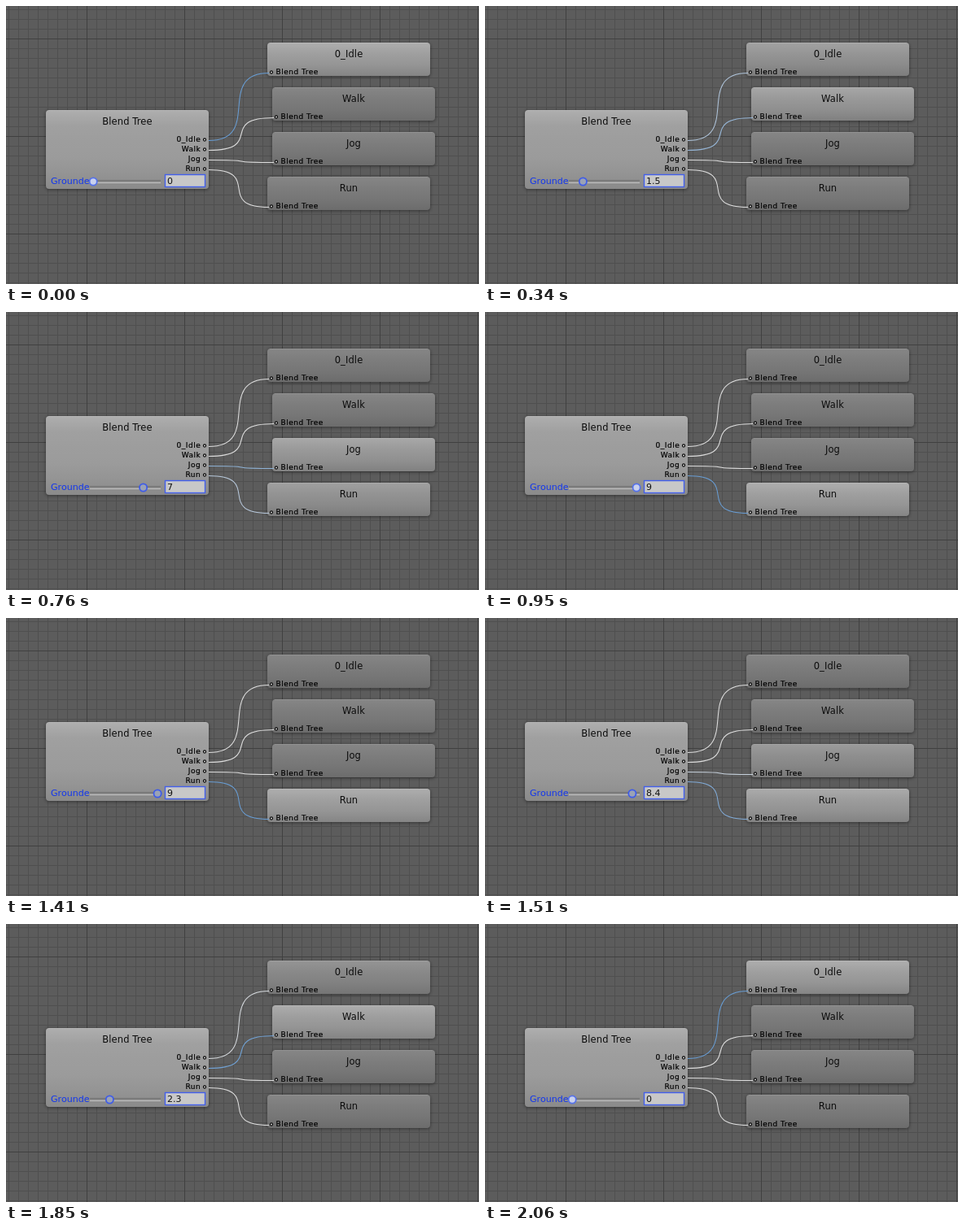
Recreate the animation shown at these times as an HTML page with a canvas. Size 581 by 342 pixels, loop 2.22 s.

```html
<!DOCTYPE html>
<html>
<head>
<meta charset="utf-8">
<title>Blend tree</title>
<style>
html, body { margin: 0; width: 100%; height: 100%; overflow: hidden; background: #5b5b5b; }
canvas { display: block; }
</style>
</head>
<body>
<canvas id="stage" width="581" height="342"></canvas>
<script>
const W = 581, H = 342, LOOP = 2220;
const canvas = document.getElementById('stage');
const ctx = canvas.getContext('2d');
const FONT = '"DejaVu Sans", Verdana, sans-serif';

// slider drag: [time, value]
const drag = [
  [0, 0], [120, 0], [220, 0.45], [340, 1.5], [460, 3], [580, 4.7], [610, 5.1],
  [900, 8.8], [935, 9], [1470, 9], [1510, 8.4], [1630, 5.7], [1780, 3.2],
  [1930, 1.4], [2050, 0], [LOOP, 0]
];

const clips = [
  { name: '0_Idle', x: 321, y: 45, at: 0 },
  { name: 'Walk', x: 327, y: 100, at: 2.5 },
  { name: 'Jog', x: 327, y: 155, at: 6 },
  { name: 'Run', x: 321, y: 210, at: 9 }
];

const mix = (a, b, k) => a + (b - a) * k;
const rgb = (r, g = r, b = r) => `rgb(${Math.round(r)},${Math.round(g)},${Math.round(b)})`;

function valueAt(t) {
  const i = drag.findIndex(p => p[0] > t);
  const [t0, v0] = drag[i - 1], [t1, v1] = drag[i];
  return Math.round(mix(v0, v1, (t - t0) / (t1 - t0)) * 10) / 10;
}

function weight(i, v) {
  const at = clips[i].at;
  const next = clips[v < at ? i - 1 : i + 1];
  return next ? Math.max(0, 1 - (v - at) / (next.at - at)) : 1;
}

function text(str, x, y, size, { align = 'left', color = '#0c0c0c', spacing = 0, bold = 0 } = {}) {
  ctx.font = `${size}px ${FONT}`;
  ctx.textAlign = align;
  ctx.letterSpacing = spacing + 'px';
  ctx.fillStyle = color;
  ctx.fillText(str, x, y);
  if (bold) {
    ctx.strokeStyle = color;
    ctx.lineWidth = bold;
    ctx.strokeText(str, x, y);
  }
  ctx.letterSpacing = '0px';
}

const title = (str, x, y) => text(str, x, y, 11.5, { align: 'center', spacing: 0.1 });
const small = (str, x, y, align) => text(str, x, y, 9, { align, spacing: 0.5, bold: 0.2, color: '#000' });

function grid() {
  ctx.fillStyle = '#5c5c5c';
  ctx.fillRect(0, 0, W, H);
  for (const major of [false, true]) {
    ctx.fillStyle = major ? '#404040' : '#4f4f4f';
    for (let i = -8; i <= 40; i++) {
      if ((i % 10 === 0) !== major) continue;
      ctx.fillRect(99 + i * 12, 0, 1, H);
      ctx.fillRect(0, 40 + i * 12, W, 1);
    }
  }
}

function box(x, y, w, h, shades) {
  ctx.save();
  ctx.shadowColor = 'rgba(0,0,0,0.45)';
  ctx.shadowBlur = 4;
  ctx.shadowOffsetY = 1;
  const fill = ctx.createLinearGradient(0, y, 0, y + h);
  shades.forEach((s, i) => fill.addColorStop(i / (shades.length - 1), rgb(s)));
  ctx.fillStyle = fill;
  ctx.beginPath();
  ctx.roundRect(x, y, w, h, 4);
  ctx.fill();
  ctx.restore();
  ctx.fillStyle = 'rgba(255,255,255,0.1)';
  ctx.fillRect(x + 3, y, w - 6, 1);
}

function port(x, y) {
  ctx.beginPath();
  ctx.arc(x, y, 1.6, 0, 7);
  ctx.fillStyle = '#c8c8c8';
  ctx.fill();
  ctx.lineWidth = 1.1;
  ctx.strokeStyle = '#0a0a0a';
  ctx.stroke();
}

function wire(i, k) {
  const { x, y } = clips[i];
  const x0 = 249, y0 = 165.5 + i * 12, x1 = x + 2, y1 = y + 37.5;
  const pull = (x1 - x0) / 2 + 30;
  ctx.beginPath();
  ctx.moveTo(x0, y0);
  ctx.bezierCurveTo(x0 + pull, y0, x1 - pull, y1, x1, y1);
  ctx.lineWidth = 1.05;
  ctx.strokeStyle = rgb(mix(222, 104, k), mix(222, 157, k), mix(222, 212, k));
  ctx.stroke();
}

function slider(v, pressed) {
  ctx.save();
  ctx.beginPath();
  ctx.rect(50, 205, 53, 18);
  ctx.clip();
  text('Grounded', 55, 219, 11.1, { color: '#1236ee' });
  ctx.restore();

  ctx.fillStyle = '#707070';
  ctx.fillRect(103, 214, 87, 1);
  ctx.fillStyle = '#8b8b8b';
  ctx.fillRect(103, 215, 87, 2);
  ctx.fillStyle = '#c6c6c6';
  ctx.fillRect(103, 217, 87, 1);

  ctx.beginPath();
  ctx.arc(107.2 + v * 8.77, 216, 4.6, 0, 7);
  ctx.fillStyle = pressed ? '#9aa2b6' : '#c9d1ee';
  ctx.fill();
  ctx.lineWidth = 1.8;
  ctx.strokeStyle = pressed ? '#3f5ce8' : '#5672ea';
  ctx.stroke();

  ctx.fillStyle = '#c8c8c8';
  ctx.fillRect(195, 207, 50, 16);
  ctx.lineWidth = 1.4;
  ctx.strokeStyle = '#435fec';
  ctx.strokeRect(195.5, 207.5, 49, 15);
  text(String(v), 198, 219, 11, { color: '#111' });
}

function draw(t) {
  const v = valueAt(t);
  const pressed = (t >= 100 && t < 950) || (t >= 1410 && t < 2060);
  grid();

  box(49, 128, 200, 97, [174, 160, 157, 155, 148, 138]);
  title('Blend Tree', 149, 146);

  clips.forEach((clip, i) => {
    const { name, x, y } = clip;
    const k = weight(i, v);
    const glow = k ** 0.4;
    box(x, y, 200, 41, [mix(134, 174, glow), mix(125, 159, glow), mix(118, 149, glow), mix(108, 133, glow)]);
    title(name, x + 100, y + 18);
    small('Blend Tree', x + 10.5, y + 39, 'left');
    small(name, 239.2, 167.3 + i * 12, 'right');
    wire(i, k);
    port(x + 5, y + 36.5);
    port(244, 164.5 + i * 12);
  });

  slider(v, pressed);
}

const start = performance.now();
function tick() {
  draw((performance.now() - start) % LOOP);
  requestAnimationFrame(tick);
}
tick();
</script>
</body>
</html>
```
